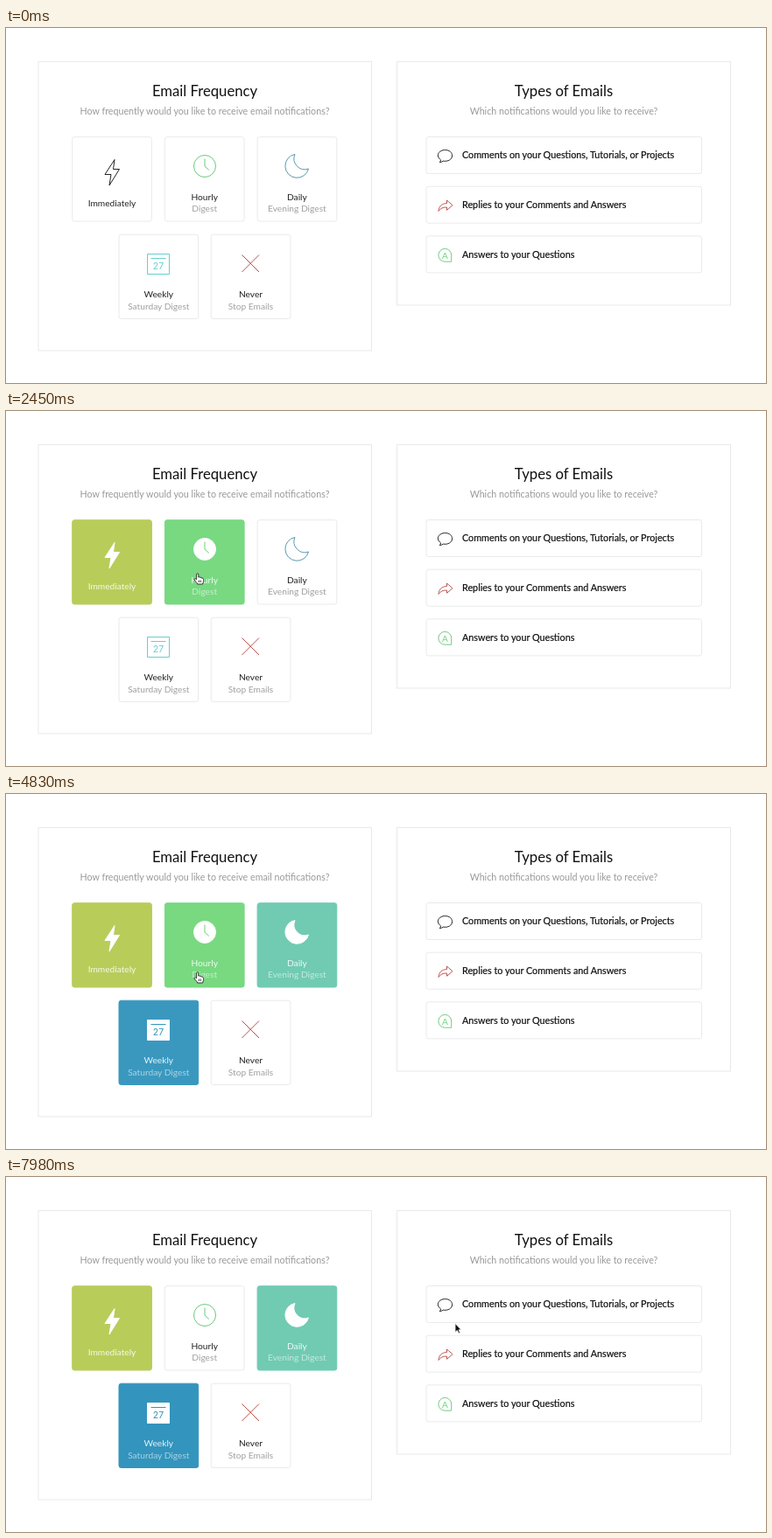
These frames come from a looping animation (868x406 px, 8000 ms). An HTML page:

```html
<!DOCTYPE html>
<html lang="en">
<head>
<meta charset="utf-8">
<title>Email preferences</title>
<style>
html, body { margin: 0; width: 100%; height: 100%; overflow: hidden; background: #fff; }
svg { display: block; width: 100%; height: 100%; font-family: Lato, "Open Sans", sans-serif; }
.panel { fill: #fff; stroke: #e9e9e9; }
.row { fill: #fff; stroke: #e8eaeb; }
.head { font-size: 16.7px; fill: #111; text-anchor: middle; }
.sub { font-size: 10.7px; fill: #999; text-anchor: middle; }
.label { font-size: 10.8px; fill: #111; stroke: #111; stroke-width: .2px; }
.card text { font-size: 10.2px; text-anchor: middle; }
.card .num { font: 10.5px Inter, sans-serif; }
.icon { fill: none; stroke-width: 1; stroke-linejoin: round; }
</style>
</head>
<body>
<svg id="stage" viewBox="0 0 868 406">
  <rect class="panel" x="37" y="38.5" width="380.5" height="330.5"/>
  <text class="head" x="227" y="78">Email Frequency</text>
  <text class="sub" x="227" y="99">How frequently would you like to receive email notifications?</text>

  <rect class="panel" x="446.5" y="38.5" width="381" height="278.5"/>
  <text class="head" x="637" y="78">Types of Emails</text>
  <text class="sub" x="637" y="99">Which notifications would you like to receive?</text>

  <g id="rows"></g>
  <path class="icon" stroke="#222" d="M496.5 150.8C490 146 494.5 139.5 501.5 139.5C512 139.5 512.5 152 501.5 152.3L499.3 152.1Q497.5 153.7 495.2 153.5Q496.7 152.3 496.5 150.8Z"/>
  <path class="icon" stroke="#bd5753" d="M494 209.5C494.5 203.5 498 200.7 503.5 200.5V197L510 202.7L503.5 208.3V205C499 204.8 496.3 206.3 494 209.5Z"/>
  <path class="icon" stroke="#6fcd80" d="M508.7 267.2H501.5A7.4 7.4 0 1 1 508.7 260Z"/>
  <text x="501.5" y="263.5" font-size="10" fill="#6fcd80" text-anchor="middle">A</text>

  <g id="cards"></g>
  <path id="hand" fill="#fff" stroke="#222" stroke-width=".9" stroke-linejoin="round"
    d="M-1.4 6.5V.8C-1.4 -.6 .8 -.6 .8 .8V4.2C1.2 3.4 2.8 3.6 2.8 4.7C3.4 4 4.8 4.3 4.8 5.4C5.6 4.9 6.6 5.4 6.6 6.4V8.6C6.6 10 5.6 10.6 5.6 12H-.4C-.6 10.4 -2.8 8.8 -3.9 6.9C-4.4 5.8 -3 5.2 -1.4 6.8ZM1.3 7.5V10M3.3 7.5V10"/>
  <path id="arrow" fill="#111" stroke="#fff" stroke-width=".8" d="M0 0V10L2.4 7.9L4 11.4L5.6 10.7L4.1 7.3H7Z"/>
</svg>
<script>
const LOOP = 8000, STEP = 70, FADE = 210;
const $ = id => document.getElementById(id);
const WHITE = [255, 255, 255], INK = [34, 34, 34], GREY = [160, 160, 160];
const HOVER = [241, 241, 245], EDGE = [232, 234, 235];

function add(parent, tag, attrs, text) {
  const el = document.createElementNS("http://www.w3.org/2000/svg", tag);
  for (const k in attrs) el.setAttribute(k, attrs[k]);
  if (text) el.textContent = text;
  parent.appendChild(el);
  return el;
}
const mix = (a, b, k) => a.map((v, i) => v + (b[i] - v) * k);
const rgb = c => `rgb(${c.map(Math.round)})`;
const clamp = v => Math.max(0, Math.min(1, v));
const ease = k => k * k * (3 - 2 * k);

["Comments on your Questions, Tutorials, or Projects",
 "Replies to your Comments and Answers",
 "Answers to your Questions"].forEach((text, i) => {
  const y = 124.5 + i * 56.7;
  add($("rows"), "rect", { class: "row", x: 480, y, width: 314.5, height: 42, rx: 2.5 });
  add($("rows"), "text", { class: "label", x: 521, y: y + 24.6 }, text);
});

// on / hover: [start, end] spans in ms
const cards = [
  { x: 75.7, y: 124.7, title: "Immediately", color: [184, 204, 90], line: INK,
    shape: "M124 150.5L113 167.5H120L118 180L129.5 161.5H122.5Z", solid: true,
    on: [[1330, 1e5]], hover: [[490, 1750]] },
  { x: 181.4, y: 124.7, title: "Hourly", note: "Digest", color: [105, 213, 115], line: [104, 203, 122],
    shape: "M214.5 158a12.5 12.5 0 1 1 25 0a12.5 12.5 0 1 1 -25 0Z", detail: "M227 149.5V158L231.8 162.5", solid: true,
    on: [[2170, 5040]], hover: [[1890, 2660], [4690, 5600]] },
  { x: 287.1, y: 124.7, title: "Daily", note: "Evening Digest", color: [112, 203, 178], line: [92, 152, 174],
    shape: "M330 144.5A13.5 13.5 0 1 0 345.5 161A12.3 12.3 0 0 1 330 144.5Z", solid: true,
    on: [[2940, 1e5]], hover: [[2800, 3850]] },
  { x: 129, y: 236.2, title: "Weekly", note: "Saturday Digest", color: [51, 148, 189], line: [104, 205, 205],
    shape: "M161.5 258.5H186.5V281.5H161.5Z", detail: "M165.5 263.5H182.5", num: "27", solid: true,
    on: [[4130, 1e5]], hover: [[4060, 4760]] },
  { x: 234.2, y: 236.2, title: "Never", note: "Stop Emails", color: [216, 74, 74], line: [187, 78, 74],
    shape: "M269.5 259.5L289 279M289 259.5L269.5 279",
    on: [[6160, 7210]], hover: [[5740, 7560]], snap: true }
];

for (const c of cards) {
  const cx = c.x + 45.3;
  c.g = add($("cards"), "g", { class: "card" });
  c.box = add(c.g, "rect", { x: c.x, y: c.y, width: 90.7, height: 96.3, rx: 2.5 });
  c.icon = add(c.g, "path", { class: "icon", d: c.shape });
  if (c.detail) c.mark = add(c.g, "path", { class: "icon", d: c.detail });
  if (c.num) c.digits = add(c.g, "text", { class: "num", x: 174, y: 275.5 }, c.num);
  c.name = add(c.g, "text", { x: cx, y: c.y + (c.note ? 72 : 79.2) }, c.title);
  if (c.note) c.small = add(c.g, "text", { x: cx, y: c.y + 85.6 }, c.note);
}

// pointer tip: [time, x, y]
const path = [
  [0, -12, 50], [840, 134, 137], [1610, 134, 137], [1960, 219, 186],
  [2520, 219, 186], [2870, 327, 181], [3640, 327, 181], [4130, 180, 272],
  [4620, 180, 272], [4830, 219, 204], [5460, 219, 204], [5880, 271, 275],
  [6370, 271, 275], [6440, 273, 274.5], [7420, 273, 274.5], [7980, 513, 167.5]
];

function pointer(t) {
  let i = 0;
  while (i < path.length - 2 && t >= path[i + 1][0]) i++;
  const [t0, ...a] = path[i], [t1, ...b] = path[i + 1];
  return mix(a, b, ease(clamp((t - t0) / (t1 - t0))));
}

function level(t, spans, fade) {
  return Math.max(...spans.map(([a, b]) => fade
    ? clamp((t - a + STEP) / fade) * (1 - clamp((t - b + STEP) / fade))
    : +(t >= a && t < b)));
}

function drawCard(c, t, muted) {
  const on = level(t, c.on, c.snap ? 0 : FADE), hover = level(t, c.hover, FADE);
  const full = mix(c.color, WHITE, hover * 0.1);
  const bg = mix(mix(WHITE, HOVER, hover), full, on);
  const line = rgb(mix(muted ? INK : c.line, WHITE, on));
  c.g.setAttribute("opacity", muted ? 0.5 : 1);
  c.box.setAttribute("fill", rgb(bg));
  c.box.setAttribute("stroke", rgb(mix(EDGE, full, on)));
  c.icon.setAttribute("stroke", line);
  if (c.solid) c.icon.style.fill = `rgba(255,255,255,${on})`;
  const inner = rgb(mix(muted && on < 0.5 ? INK : c.line, c.color, on));
  if (c.mark) c.mark.setAttribute("stroke", inner);
  if (c.digits) c.digits.setAttribute("fill", inner);
  c.name.setAttribute("fill", rgb(mix(INK, mix(full, WHITE, 0.88), on)));
  if (c.small) c.small.setAttribute("fill", rgb(mix(GREY, mix(full, WHITE, 0.58), on)));
}

function draw(ms) {
  const t = Math.floor(ms / STEP) * STEP;
  const never = cards[4];
  const stopped = level(t, never.on, 0) > 0;
  for (const c of cards) drawCard(c, t, stopped && c !== never);

  const [x, y] = pointer(t);
  const over = cards.some(c => x > c.x && x < c.x + 91 && y > c.y && y < c.y + 97);
  for (const id of ["hand", "arrow"]) {
    $(id).setAttribute("transform", `translate(${x.toFixed(1)} ${y.toFixed(1)})`);
    $(id).setAttribute("visibility", (id === "hand") === over ? "visible" : "hidden");
  }
}

const start = performance.now();
function tick() {
  draw((performance.now() - start) % LOOP);
  requestAnimationFrame(tick);
}
draw(0);
requestAnimationFrame(tick);
</script>
</body>
</html>
```
